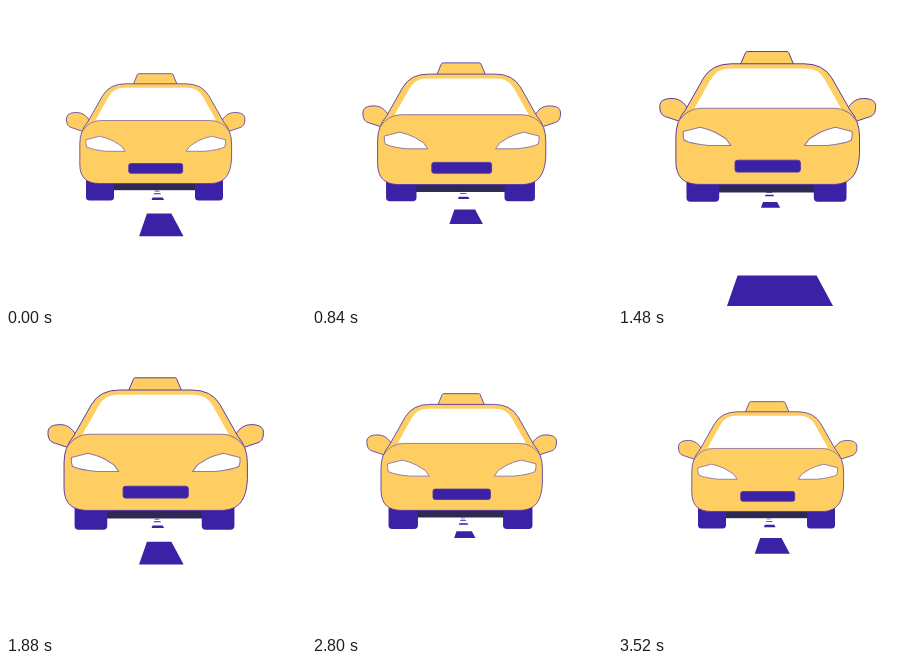
Write an HTML page that moves like this. It is 300x300 px and loops after 3.56 s.

```html
<!DOCTYPE html>
<html lang="en">
<head>
<meta charset="utf-8">
<title>Taxi</title>
<style>
  html, body { margin: 0; width: 100%; height: 100%; overflow: hidden; background: #fff; }
  svg { display: block; width: 100%; height: 100%; }
  .ink { fill: #3b21a6; }
  .paint { fill: #ffce63; }
  .glass { fill: #fff; }
  .line { stroke: #5435a3; stroke-width: .8; stroke-linejoin: round; }
  .soft { stroke: #93799c; stroke-width: .9; stroke-linejoin: round; }
</style>
</head>
<body>
<svg viewBox="0 0 300 300">
  <defs>
    <path id="mirror" class="paint line" d="M-66 -63 C-69 -68 -73 -71.500 -79 -71.500 C-85 -71.500 -89.200 -70 -89.200 -65 C-89.200 -59 -87 -57 -83 -56 L-71 -52 Z"/>
    <path id="lamp" class="glass soft" d="M-69.800 -44.300 L-56 -47.800 Q-48 -46 -42.700 -43.200 L-34.500 -38.200 L-30.500 -32.700 L-49 -32.700 Q-63 -34 -69 -37 Q-70.300 -41 -69.800 -44.300 Z"/>
    <rect id="wheel" class="ink" x="-68.500" y="-23" width="28" height="22.500" rx="3.500"/>
  </defs>

  <path id="road" class="ink"/>

  <g id="belly">
    <rect x="-43" y="-4" width="86" height="10.200" fill="#2c2a55"/>
  </g>

  <g id="wheels">
    <use href="#wheel"/>
    <use href="#wheel" transform="scale(-1 1)"/>
  </g>

  <g id="car">
    <use href="#mirror"/>
    <use href="#mirror" transform="scale(-1 1)"/>
    <path class="paint line" d="M-22.500 -99.500 L-18.300 -109.500 Q-17.900 -110.300 -17 -110.300 H16 Q16.900 -110.300 17.300 -109.500 L21.500 -99.500 Z"/>
    <path class="paint line" d="M-68 -62 L-53 -88.500 Q-46 -100.200 -30 -100.200 H30 Q46 -100.200 53 -88.500 L68 -62 Q75.900 -53 75.900 -40 V-26 C75 -8 68 -.5 54 -.5 H-56 C-69 -.5 -75.900 -6 -75.900 -20 V-40 Q-75.900 -53 -68 -62 Z"/>
    <path class="glass" d="M-60.500 -63.500 L-47 -87.500 Q-42 -96.200 -32 -96.200 H32 Q42 -96.200 47 -87.500 L60.500 -63.500 Z"/>
    <path class="soft" fill="none" d="M-74 -52 Q-67 -63.500 -54 -63.500 H54 Q67 -63.500 74 -52"/>
    <use href="#lamp"/>
    <use href="#lamp" transform="scale(-1 1)"/>
    <rect class="ink line" x="-27" y="-20.500" width="54" height="9.800" rx="2"/>
  </g>
</svg>
<script>
const LOOP = 3560, STEP = 40, PEAK = 1690;
const VANISH = { x: 150.5, y: 180 };
const GAP = 0.051, DASH = 0.0163;
const bounce = [[0, 178], [840, 179.1], [1480, 179], [1880, 177], [2440, 176.9], [3160, 176.9], [3560, 178]];

const [road, belly, wheels, car] = ['road', 'belly', 'wheels', 'car'].map(id => document.getElementById(id));
const ease = p => 0.5 - 0.5 * Math.cos(Math.PI * p);

function nearness(t) {
  return t < PEAK ? ease(t / PEAK) : 1 - ease(((t - PEAK) / (LOOP - PEAK)) ** 0.86);
}

function height(t) {
  const i = bounce.findIndex(([at]) => at > t);
  const [t0, y0] = bounce[i - 1], [t1, y1] = bounce[i];
  return y0 + (y1 - y0) * ease((t - t0) / (t1 - t0));
}

// Depth is the inverse of the distance below the horizon.
function edge(depth) {
  const d = depth > 0.004 ? 1 / depth : 250;
  const y = VANISH.y + d;
  return [[VANISH.x - 0.346 * d, y], [VANISH.x + 0.538 * d, y]];
}

function dashes(t) {
  const phase = (0.71 + 0.1489 * t / STEP) % 1;
  let d = '';
  for (let i = 0; i < 6; i++) {
    const far = (phase + i) * GAP;
    const [a, b] = edge(far), [c, e] = edge(far - DASH);
    d += `M${a}L${b}L${e}L${c}Z`;
  }
  return d;
}

function place(part, x, y, scale) {
  part.setAttribute('transform', `translate(${x} ${y}) scale(${scale})`);
}

function draw(now) {
  const t = Math.floor((now % LOOP) / STEP) * STEP;
  const u = nearness(t), y = height(t), scale = 1 + 0.218 * u;
  road.setAttribute('d', dashes(t));
  place(wheels, 148.5, 195 + 1.5 * u, 1 + 0.175 * u);
  place(belly, 149.7, y, scale);
  place(car, 149.7, y, scale);
}

const start = performance.now();
function tick() {
  draw(performance.now() - start);
  requestAnimationFrame(tick);
}
tick();
</script>
</body>
</html>
```
